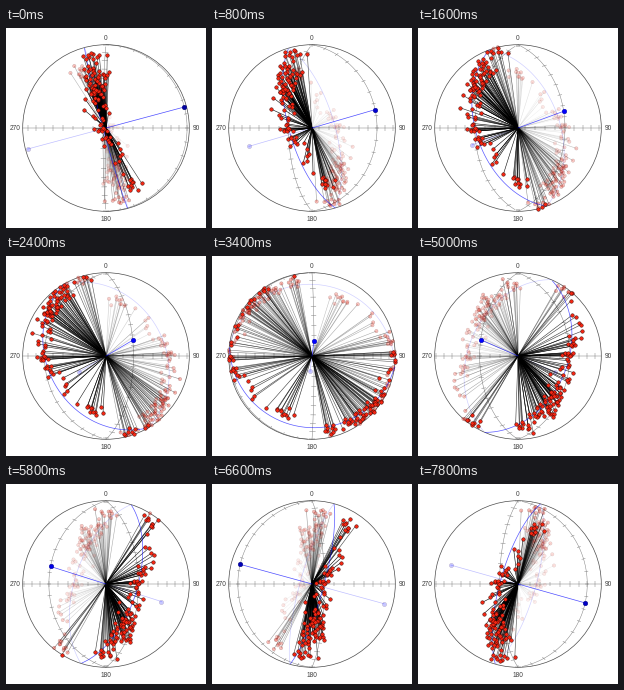
These frames come from a looping animation (200x200 px, 8 s). A matplotlib script:

```python
import numpy as np
import matplotlib.pyplot as plt
from matplotlib.animation import FuncAnimation
from matplotlib.collections import LineCollection

FRAMES, STEP_MS = 40, 200
START, TURN = 87, 5          # degrees, degrees per frame
R = 83.3
TILT = np.radians(15)

POLE = np.array([0, np.sin(TILT), np.cos(TILT)])
EAST = np.array([1.0, 0, 0])
DIP = np.array([0, -np.cos(TILT), np.sin(TILT)])


def girdle(t, off=0):
    """Unit vectors at angle t along the girdle, off degrees towards its pole."""
    t, off = np.radians(t)[:, None], np.radians(off + 0 * t)[:, None]
    ring = np.cos(t) * EAST + np.sin(t) * DIP
    return np.cos(off) * ring + np.sin(off) * POLE


def sphere(lat, lon):
    lat, lon = np.radians(lat), np.radians(lon)
    return np.stack([np.cos(lat) * np.sin(lon),
                     np.sin(lat) + 0 * lon,
                     np.cos(lat) * np.cos(lon)], axis=-1)


def spin(v, deg):
    """Rotate about the north-south axis."""
    c, s = np.cos(np.radians(deg)), np.sin(np.radians(deg))
    x, y, z = v[..., 0], v[..., 1], v[..., 2]
    return np.stack([x * c + z * s, y, z * c - x * s], axis=-1)


def project(v):
    """Equal-area projection, both hemispheres onto one disc."""
    return R * v[..., :2] / np.sqrt(1 + np.abs(v[..., 2:]))


def lower(v):
    return np.where(v[..., 2:] >= 0, project(v), np.nan)


def upper(v):
    return np.where(v[..., 2:] < 0, project(v), np.nan)


def spokes(pts):
    return np.stack([np.zeros_like(pts), pts], axis=1)


def tint(rgb, alpha):
    """One RGBA row per alpha value."""
    alpha = np.clip(alpha, 0.06, 1)
    return np.column_stack([np.tile(rgb, (alpha.size, 1)), alpha])


rng = np.random.default_rng(12)
dense = rng.normal(43, 11, 38)
wide = rng.uniform(-8, 84, 46)
main = np.concatenate([dense, wide])
sparse = rng.uniform(106, 188, 30)
main_off = rng.normal(0, 5.5, main.size) - 4 * np.sin(np.radians(main))
sparse_off = rng.normal(0, 4, sparse.size) + 11 * np.sin(np.radians(sparse))
data = np.vstack([girdle(main, main_off), girdle(sparse, sparse_off)])

ring = girdle(np.arange(0, 361, 2.0))
lats = np.arange(-180, 181, 3.0)
meridians = [sphere(lats, 0 * lats), sphere(lats, 90 + 0 * lats)]

# Tick marks every ten degrees, as pairs of end points
HALF = 2.3
marks = np.arange(-170, 181, 10.0)
side = np.array([-HALF, HALF])
eq_ticks = sphere(side[None, :] + 0 * marks[:, None],
                  marks[:, None] + 0 * side[None, :])


def meridian_ticks(lon):
    mid = sphere(marks, lon + 0 * marks)
    normal = sphere(np.array([0.0]), np.array([lon + 90.0]))
    d = np.radians(HALF)
    ends = [np.cos(d) * mid + s * np.sin(d) * normal for s in (-1, 1)]
    return np.stack(ends, axis=1)


ticks = np.concatenate([eq_ticks, meridian_ticks(0), meridian_ticks(90)])

fig = plt.figure(figsize=(2, 2), dpi=100, facecolor="white")
ax = fig.add_axes([0, 0, 1, 1])
ax.set(xlim=(-100, 100), ylim=(-100, 100))
ax.axis("off")

GREY = "#808080"
RED = (0.95, 0.15, 0.07)
BLACK = (0, 0, 0)
EDGE = (0.2, 0, 0)
ax.add_patch(plt.Circle((0, 0), R, fill=False, ec="#4c4c4c", lw=0.5, zorder=2))
ax.plot([-R, R], [0, 0], color=GREY, lw=0.35, zorder=1)
for text, x, y in [("0", 0, 90.5), ("90", 90.5, 0),
                   ("180", 0, -90.5), ("270", -90.5, 0)]:
    ax.text(x, y, text, family="Liberation Sans", fontsize=4.8,
            color="#404040", ha="center", va="center_baseline")


def segments(color, lw, z):
    lines = LineCollection([], colors=color, linewidths=lw, zorder=z)
    return ax.add_collection(lines)


def dots(color, size, alpha, z):
    return ax.scatter([], [], s=size, color=[color], edgecolors=[EDGE],
                      linewidths=0.3, alpha=alpha, zorder=z)


tick_lines = segments(GREY, 0.35, 1)
arcs = [ax.plot([], [], color=GREY, lw=0.35, zorder=1)[0] for _ in meridians]
back_ring, = ax.plot([], [], color="blue", lw=0.5, alpha=0.18, zorder=2)
front_ring, = ax.plot([], [], color="blue", lw=0.5, alpha=0.65, zorder=5.5)
back_lines = segments(BLACK, 0.4, 3)
back_dots = dots(RED, 6, None, 4)
front_lines = segments(BLACK, 0.42, 5)
front_dots = dots(RED, 6.5, None, 6)
back_axis, = ax.plot([], [], color="blue", lw=0.5, alpha=0.25, zorder=3)
front_axis, = ax.plot([], [], color="blue", lw=0.5, alpha=0.7, zorder=5.5)
back_pole = dots("blue", 10, 0.22, 4)
front_pole = dots("blue", 11, None, 9)


def draw(i):
    turn = START - TURN * i

    for arc, m in zip(arcs, meridians):
        arc.set_data(*lower(spin(m, turn)).T)
    tv = spin(ticks, turn)
    visible = tv[..., 2].mean(axis=1) > -1e-6
    tick_lines.set_segments(project(tv[visible]))

    rv = spin(ring, turn)
    front_ring.set_data(*lower(rv).T)
    back_ring.set_data(*upper(rv).T)

    # Each axis shows both ends; the upper one fades with depth
    dv = spin(data, turn)
    front = project(dv) * np.where(dv[:, 2:] < 0, -1, 1)
    depth = np.abs(dv[:, 2])
    front_lines.set_segments(spokes(front))
    front_lines.set_color(tint(BLACK, 0.6 + 0.5 * depth))
    back_lines.set_segments(spokes(-front))
    back_lines.set_color(tint(BLACK, 0.52 - 0.6 * depth))
    front_dots.set_offsets(front)
    back_dots.set_offsets(-front)
    fade = 0.38 - 0.32 * depth
    back_dots.set_facecolor(tint(RED, fade))
    back_dots.set_edgecolor(tint(EDGE, fade))

    pv = spin(POLE, turn)
    pole = project(pv) * (-1 if pv[2] < 0 else 1)
    front_axis.set_data([0, pole[0]], [0, pole[1]])
    back_axis.set_data([0, -pole[0]], [0, -pole[1]])
    front_pole.set_offsets([pole])
    back_pole.set_offsets([-pole])
    shade = (0, 0, min(1, 0.6 + 0.6 * abs(pv[2])))
    front_pole.set_facecolor([shade])
    front_pole.set_edgecolor([(0, 0, 0.6 * shade[2])])


anim = FuncAnimation(fig, draw, frames=FRAMES, interval=STEP_MS,
                     repeat=True, repeat_delay=0)
plt.show()
```
